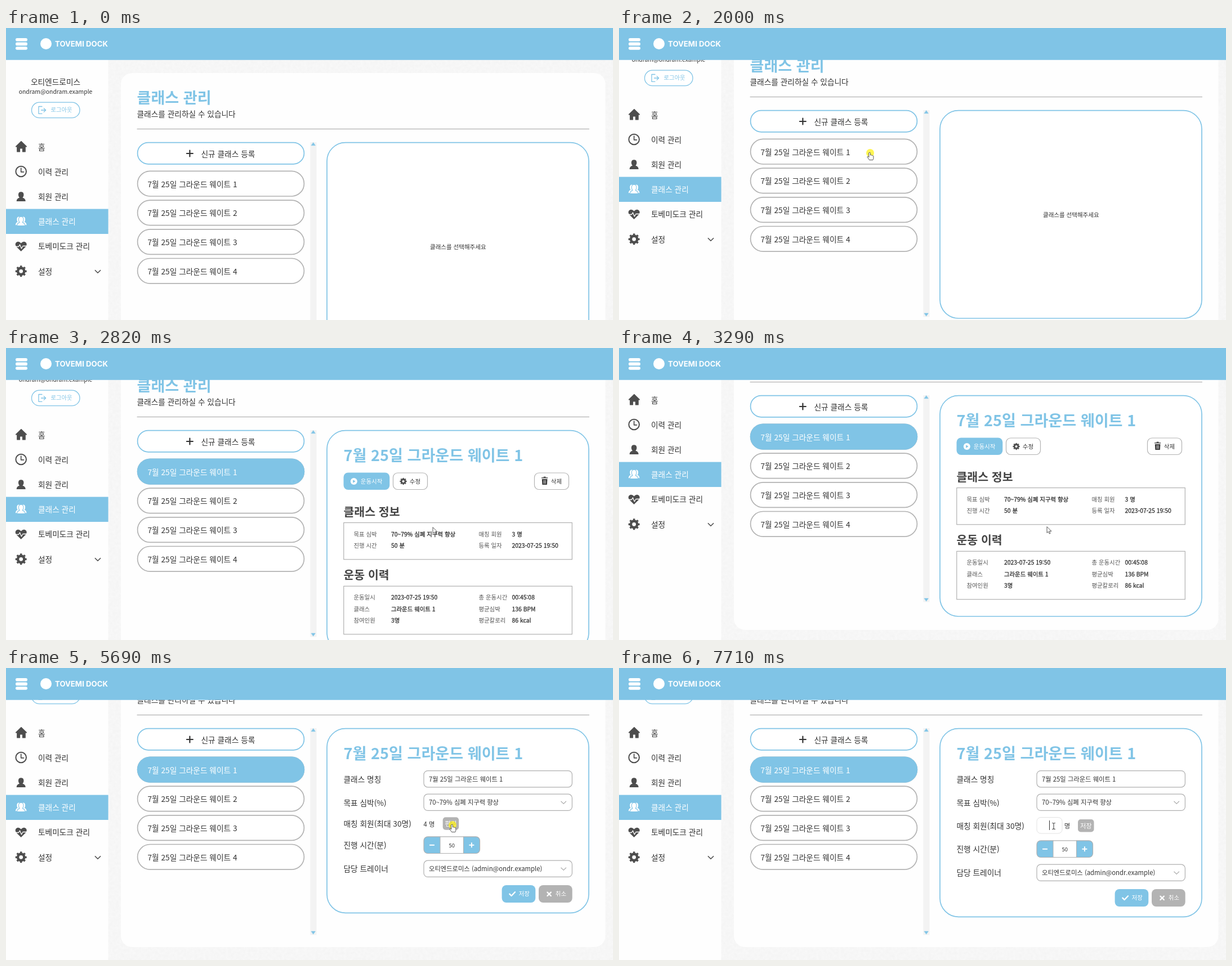
An HTML page for the animation above (8 s loop, 1078 by 519 pixels).

```html
<!DOCTYPE html>
<html lang="ko">
<head>
<meta charset="utf-8">
<title>클래스 관리</title>
<style>
html, body { margin: 0; width: 100%; height: 100%; overflow: hidden; background: #fff; }
svg { position: absolute; left: 0; top: 0; display: block; }
text { font-family: "Noto Sans CJK KR", "Noto Sans CJK", "Noto Sans KR", sans-serif; white-space: pre; }
.brand { font-family: Inter, Roboto, sans-serif; }
</style>
</head>
<body>
<svg width="1078" height="519">
  <filter id="paper" x="0" y="0" width="100%" height="100%" color-interpolation-filters="sRGB">
    <feTurbulence type="fractalNoise" baseFrequency=".2" numOctaves="2" seed="4"/>
    <feColorMatrix values=".025 0 0 0 .953  .025 0 0 0 .953  .025 0 0 0 .953  0 0 0 0 1"/>
  </filter>
  <rect x="181" y="56" width="897" height="463" filter="url(#paper)"/>
  <rect y="56" width="181.6" height="463" fill="#fefefe"/>
</svg>
<svg id="stage" width="1078" height="519"></svg>
<script>
const BLUE = '#80c4e6', GREY = '#b3b3b3', DARK = '#4d4d4d', INK = '#333';
const BODY = 13.7, SMALL = 10.5, FIELD = 11.3, TITLE = 27.1;
const LOOP = 8000;

// --- drawing helpers: text is placed by its vertical centre ---
const text = (x, cy, s, size = BODY, o = {}) =>
  `<text x="${x}" y="${cy + size * .375}" font-size="${size}" font-weight="${o.w || 400}" ` +
  `fill="${o.fill || INK}" stroke="${INK}" stroke-width="${o.thick || 0}" ` +
  `text-anchor="${o.mid ? 'middle' : 'start'}">${s}</text>`;
const box = (x1, y1, x2, y2, r, fill, stroke = 'none', sw = 1.2) =>
  `<rect x="${x1}" y="${y1}" width="${x2 - x1}" height="${y2 - y1}" rx="${r}" fill="${fill}" stroke="${stroke}" stroke-width="${sw}"/>`;
const path = (d, fill, stroke = 'none', sw = 1) =>
  `<path d="${d}" fill="${fill}" stroke="${stroke}" stroke-width="${sw}" stroke-linecap="round" stroke-linejoin="round"/>`;
const disc = (x, y, r, fill, stroke = 'none', sw = 1, attrs = '') =>
  `<circle cx="${x}" cy="${y}" r="${r}" fill="${fill}" stroke="${stroke}" stroke-width="${sw}" ${attrs}/>`;
const group = (id, body) => `<g id="${id}">${body}</g>`;
const gear = (x, y, r) =>
  disc(x, y, r * .57, 'none', DARK, r * .46) +
  disc(x, y, r * .86, 'none', DARK, r * .28, 'pathLength="16" stroke-dasharray="1 1" stroke-dashoffset=".5"');
const chevron = (x, y, w, color, sw) => path(`M${x - w} ${y - w / 2}l${w} ${w}l${w} ${-w}`, 'none', color, sw);
const panel = bottom => box(570, 203.6, 1035, bottom, 33, '#fff', BLUE, 1.7);

// --- side menu ---
const person = (x, y, fill, stroke) =>
  path(`M${x - 8} ${y + 8.5}q0-5 5.2-6.2q-2-2-2-5.2q0-5.3 4.8-5.3t4.8 5.3q0 3.2-2 5.2q5.2 1.2 5.2 6.2z`, fill, stroke, 1.2);

function sideMenu() {
  const rowY = i => 211.5 + i * 44.2;
  const names = ['홈', '이력 관리', '회원 관리', '클래스 관리', '토베미도크 관리', '설정'];
  const icons = [
    path('M27 201.5L36.5 210.8H34.2V220H29.5V214H24.5V220H19.8V210.8H17.5Z', DARK, DARK, 1.2),
    disc(26.7, 255, 9.3, 'none', DARK, 2) + path('M26.7 249V255.8H31.5', 'none', DARK, 1.7),
    person(26.7, 299.5, DARK),
    `<g transform="translate(0 343.3)"><g transform="scale(.72 .88)">${person(31.6, -.6, '#fff') + person(42.6, -.6, '#fff')}</g>` +
      `<g transform="translate(2.7 0) scale(.9 .98)">${person(26.7, 0, '#fff', BLUE)}</g></g>`,
    path('M26.7 397L18.6 389Q15 384.5 18 381.2Q22.5 377.8 26.7 382.4Q30.9 377.8 35.4 381.2Q38.4 384.5 34.8 389Z', DARK) +
      path('M16 388.5H22.5L24.5 385L27.5 392L30 387.5H37.5', 'none', '#fff', 1.3),
    gear(26.7, 432.3, 10)
  ];
  return text(88, 96, '오티엔드로미스', BODY, {mid: 1}) +
    text(88, 113.4, 'ondram@ondram.example', 10.4, {mid: 1}) +
    box(45.5, 132.2, 131, 159.6, 13.7, '#fff', BLUE, 1.3) +
    path('M64 139.5H58V152.3H64M62.5 146H70.5M67.2 142.6L70.6 146L67.2 149.4', 'none', BLUE, 1.3) +
    text(79.5, 145.5, '로그아웃', 10.3, {fill: BLUE}) +
    box(0, 321.6, 181.6, 366, 0, BLUE) +
    names.map((n, i) => text(57, rowY(i), n, BODY, {fill: i == 3 ? '#fff' : INK})).join('') +
    icons.join('') + chevron(163, 433, 4.6, DARK, 1.6);
}

// --- class list ---
function classList() {
  let s = text(232.5, 124, '클래스 관리', TITLE, {fill: BLUE, w: 700}) +
    text(232.5, 153, '클래스를 관리하실 수 있습니다') +
    path('M233 179.5H1035.5', 'none', '#999', .9) +
    box(233.6, 203.6, 529.4, 241.8, 19.1, '#fff', BLUE, 1.7) +
    path('M326.4 217.5V228.5M320.9 223H331.9', 'none', INK, 2.2) +
    text(346.5, 223.5, '신규 클래스 등록') +
    box(540.3, 203, 551.6, 570.5, 0, '#f3f3f3') +
    path('M545.8 203.8L549.3 208.8H542.3Z', BLUE, BLUE, .6) +
    path('M545.8 569L549.3 564H542.3Z', BLUE, BLUE, .6);
  for (let i = 0; i < 4; i++) {
    const y = 254.4 + i * 51.7, name = `7월 25일 그라운드 웨이트 ${i + 1}`;
    s += box(233.6, y, 529.4, y + 44.6, 22.3, '#fff', GREY, 1.7) + text(251.5, y + 23, name);
    if (!i) s += group('picked', box(232.8, y - .8, 530.2, y + 45.4, 23, BLUE) + text(251.5, y + 23, name, BODY, {fill: '#fff'}));
  }
  return s;
}

// --- right panel states, in page coordinates ---
const title = text(599.5, 248.3, '7월 25일 그라운드 웨이트 1', TITLE, {fill: BLUE, w: 700});

function detail() {
  const row = (y, a, b, c, d) => [[617.5, a], [684, b], [839.5, c], [898.5, d]]
    .map(([x, s], i) => text(x, y, s, 10.4, i % 2 ? {thick: .3} : {fill: '#555'})).join('');
  const head = (y, s) => text(599.5, y, s, 20.5, {w: 700, fill: '#444'});
  return panel(596) + title +
    box(599.5, 278.5, 681.3, 309, 8, BLUE) + disc(617.8, 294, 6, '#fff') +
    path('M616.2 291.2V296.8L620.6 294Z', BLUE) +
    text(629.8, 294.3, '운동시작', SMALL, {fill: '#fff'}) +
    box(687.5, 279, 748.5, 308.5, 8, '#fff', GREY) + gear(705.6, 294, 6.2) + text(716.8, 294.3, '수정', SMALL) +
    box(938.5, 279, 999.5, 308.5, 8, '#fff', GREY) +
    path('M951.8 290H961.4L960.8 300H952.4ZM951 287.2H962.2V288.6H951ZM954.6 285.8H958.6V287H954.6Z', INK) +
    path('M954.8 292V298M956.6 292V298M958.4 292V298', 'none', '#fff', .7) + text(967.8, 294.3, '삭제', SMALL) +
    head(348, '클래스 정보') + box(599.8, 367.5, 1005.3, 432.8, 0, '#fff', '#aaa', 1.1) +
    row(387.6, '목표 심박', '70~79% 심폐 지구력 향상', '매칭 회원', '3 명') +
    row(408.2, '진행 시간', '50 분', '등록 일자', '2023-07-25 19:50') +
    head(460.7, '운동 이력') + box(599.8, 480.3, 1005.3, 565.8, 0, '#fff', '#aaa', 1.1) +
    row(500.5, '운동일시', '2023-07-25 19:50', '총 운동시간', '00:45:08') +
    row(521, '클래스', '그라운드 웨이트 1', '평균심박', '136 BPM') +
    row(541.5, '참여인원', '3명', '평균칼로리', '86 kcal');
}

function form(editing) {
  const d = editing ? 7 : 0;
  const label = (y, s) => text(599.5, y, s);
  const field = (y, s) => box(742, y, 1005.4, y + 29.2, 7, '#fff', '#b0b0b0') + text(751, y + 15, s, FIELD);
  const select = (y, s) => field(y, s) + chevron(990.2, y + 15, 4.4, '#aaa', 1.1);
  const small = (x, y, s) => box(x, y, x + 28.5, y + 22.5, 5, GREY) + text(x + 14.3, y + 11.5, s, FIELD, {fill: '#fff', mid: 1});
  const members = editing
    ? label(376.5, '매칭 회원(최대 30명)') + box(742, 361.6, 787, 390, 7, '#fff', '#e2e2e2', 1) +
      text(790.8, 376.5, '명', FIELD) + small(815, 365, '저장') +
      group('digit', text(764.2, 376.8, '4', FIELD, {mid: 1}))
    : label(373, '매칭 회원(최대 30명)') + text(741.5, 374, '4 명', FIELD) + small(775.7, 361.2, '편집');
  const stepper =
    path('M771 395.8H749Q742 395.8 742 402.8V418.5Q742 425.5 749 425.5H771Z', BLUE) +
    path('M812.5 395.8H834.5Q841.5 395.8 841.5 402.8V418.5Q841.5 425.5 834.5 425.5H812.5Z', BLUE) +
    box(742, 395.8, 841.5, 425.5, 7, 'none', '#b0b0b0') +
    path('M771 396V425.3M812.5 396V425.3', 'none', '#b0b0b0', 1) +
    path('M752.8 410.7H760.2M823.2 410.7H830.6M826.9 407V414.4', 'none', '#fff', 1.9) +
    text(791.8, 411, '50', 9.4, {mid: 1});
  const lower = label(411.2, '진행 시간(분)') + stepper +
    label(453.2, '담당 트레이너') + select(438.2, '오티엔드로미스 (admin@ondr.example)') +
    box(880.6, 482, 940.3, 513, 8, BLUE) + path('M894.3 497.6L897.6 501L904 494.3', 'none', '#fff', 2.3) +
    text(910.6, 497, '저장', SMALL, {fill: '#fff'}) +
    box(946, 482, 1005.7, 513, 8, GREY) + path('M961.4 494.6L967.8 501M967.8 494.6L961.4 501', 'none', '#fff', 2.3) +
    text(975.8, 497, '취소', SMALL, {fill: '#fff'});
  return panel(531.3 + d) + title +
    label(294, '클래스 명칭') + field(278.6, '7월 25일 그라운드 웨이트 1') +
    label(335.5, '목표 심박(%)') + select(320.2, '70~79% 심폐 지구력 향상') +
    members + `<g transform="translate(0 ${d})">${lower}</g>`;
}

const header = box(0, 0, 1078, 56.8, 0, BLUE) +
  [18, 25.6, 33.2].map(y => box(17, y, 38, y + 5.6, 2.8, '#fff')).join('') +
  disc(71, 28, 10, '#fff') +
  '<text class="brand" x="87" y="32.7" font-size="13.2" font-weight="700" fill="#fff">TOVEMI DOCK</text>';

const pointers =
  group('arrow', path('M0 0V10.6L2.5 8.3L4.3 12.2L6 11.4L4.3 7.6H7.6Z', '#fff', '#444', .9)) +
  group('hand', path('M-1.3 .8Q0-.8 1.3 .8V5Q2.6 4 3.6 5.3Q5 4.7 5.7 6Q6.9 5.8 6.9 7.2V10Q6.9 11.6 5.9 13.6H-.5Q-1.8 11-3.8 8.8Q-4.2 7-2.8 7.2L-1.3 8.4Z', '#fff', '#444', .9)) +
  group('beam', path('M-2.4-5.5Q0-5.5 0-4V4Q0 5.5-2.4 5.5M2.4-5.5Q0-5.5 0-4M0 4Q0 5.5 2.4 5.5', 'none', '#444', 1.1));

document.getElementById('stage').innerHTML =
  group('page',
    '<rect id="card" x="204" y="80" width="860.5" rx="20" fill="#fefefe"/>' + sideMenu() + classList() +
    group('empty', panel(573) + text(753, 389, '클래스를 선택해주세요', SMALL)) +
    group('detail', detail()) + group('form', form(false)) + group('edit', form(true))) +
  header +
  '<rect id="caret" y="271" width="1" height="17" fill="#333"/>' +
  group('pointer', disc(1, 1, 7, '#fff000', 'none', 0, 'id="click" opacity=".68"') + pointers);

// --- timeline ---
const $ = id => document.getElementById(id);
const at = (table, t) => table.reduce((v, [start, x]) => t >= start ? x : v, table[0][1]);
const show = (id, on) => $(id).style.display = on ? '' : 'none';

const scenes = [[0, 'empty'], [2070, 'detail'], [4060, 'form'], [5760, 'edit']];
const scrolls = [[0, 0], [1190, 57], [3020, 114], [3090, 119], [4060, 96]];
const shapes = [[0, ''], [70, 'arrow'], [920, 'hand'], [2540, 'arrow'], [3780, 'hand'], [4060, 'arrow'], [5210, 'hand'], [5760, 'beam']];
const clicks = [[0, 0], [2000, 1], [2070, 0], [3990, 1], [4060, 0], [5690, 1], [5760, 0], [6710, 1], [6780, 0]];
const carets = [[0, 0], [6710, 767], [7180, 0], [7710, 764]];
// start, end, steps, x, y
const moves = [
  [70, 850, 12, 504, 285], [920, 920, 1, 503, 280],
  [1520, 1860, 5, 445, 221], [2470, 2750, 5, 756, 318], [2820, 2820, 1, 758, 319],
  [3290, 3290, 1, 760, 318], [3360, 3920, 9, 726, 171],
  [4520, 4940, 7, 787, 279], [5280, 5280, 1, 787, 280],
  [5480, 5620, 3, 792, 278], [5760, 5760, 1, 792, 279],
  [6360, 6640, 5, 772, 281]
];

function pointerAt(t) {
  let x = 1018, y = 518;
  for (const [t0, t1, n, tx, ty] of moves) {
    if (t < t0) break;
    const step = t >= t1 ? n : Math.floor((t - t0) / (t1 - t0) * (n - 1) + .001) + 1;
    const k = step / n, e = k * k * (3 - 2 * k);
    x += (tx - x) * e;
    y += (ty - y) * e;
  }
  return [x, y];
}

function draw(t) {
  const scene = at(scenes, t), shape = at(shapes, t), caret = at(carets, t);
  for (const id of ['empty', 'detail', 'form', 'edit']) show(id, id == scene);
  for (const id of ['arrow', 'hand', 'beam']) show(id, id == shape);
  show('picked', scene != 'empty');
  show('digit', t < 7510);
  show('click', at(clicks, t));
  show('caret', caret);
  $('caret').setAttribute('x', caret);
  $('card').setAttribute('height', scene == 'detail' ? 540 : 512);
  $('page').setAttribute('transform', `translate(0 ${-at(scrolls, t)})`);
  $('pointer').setAttribute('transform', `translate(${pointerAt(t)})`);
}

function tick() {
  draw(performance.now() % LOOP);
  requestAnimationFrame(tick);
}
tick();
</script>
</body>
</html>
```
